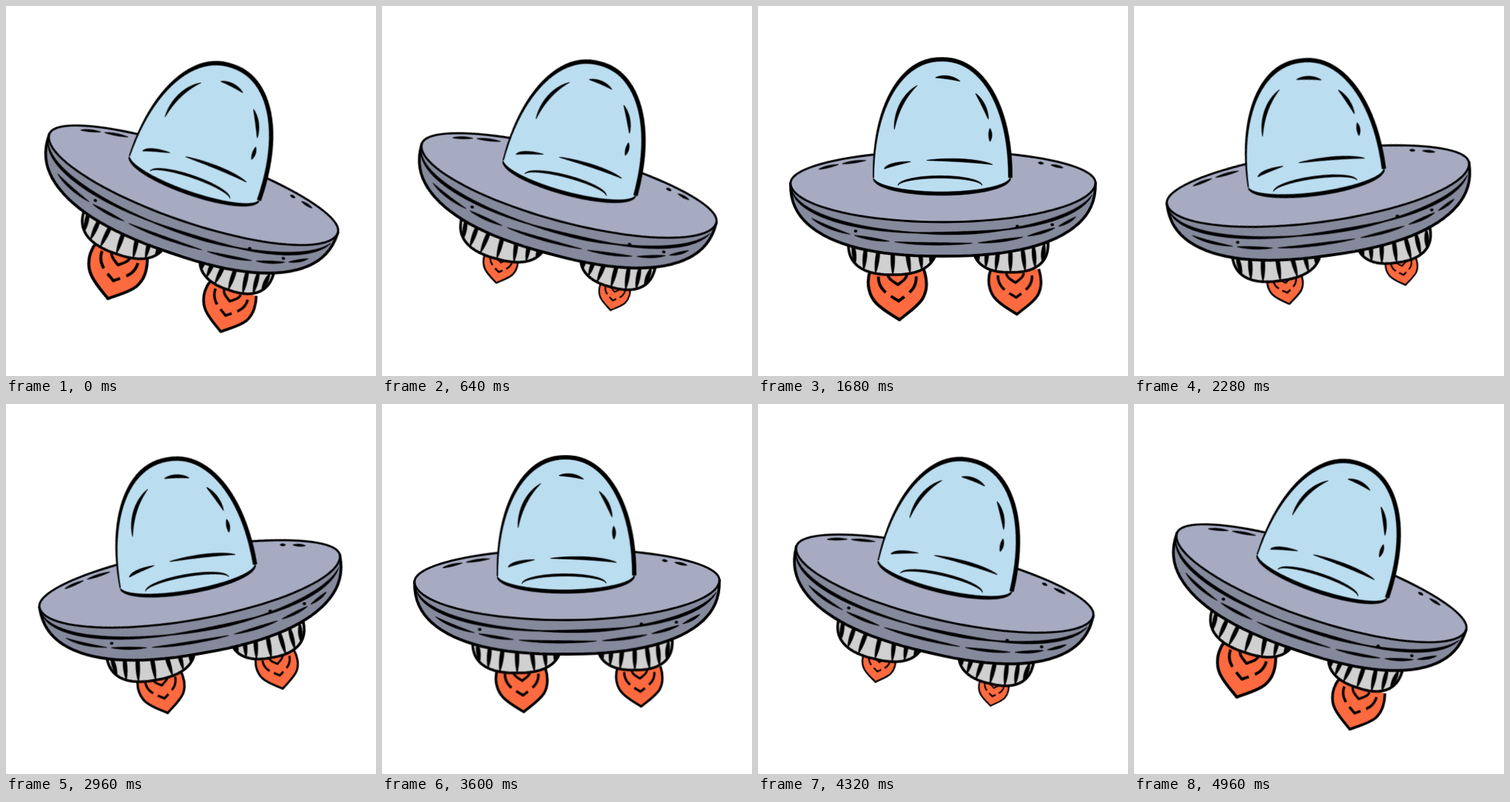
These frames come from a looping animation (500 by 500 pixels, 5000 ms). An HTML page:

```html
<!DOCTYPE html>
<html lang="en">
<head>
<meta charset="utf-8">
<title>Flying saucer</title>
<style>
  html, body { margin: 0; width: 100%; height: 100%; overflow: hidden; background: #fff; }
  svg { display: block; width: 100vw; height: 100vh; }
  path { stroke-linejoin: round; }

  #ship { transform-origin: 250px 250px; animation: rock 5s infinite; }
  @keyframes rock {
    0%   { transform: rotate(18.9deg); animation-timing-function: cubic-bezier(.33, 0, .67, 1); }
    56%  { transform: rotate(-10.4deg); animation-timing-function: cubic-bezier(.3, 0, .6, 1); }
    100% { transform: rotate(18.5deg); }
  }

  .burn { transform-origin: 0 0; animation: burn 1.66667s cubic-bezier(.33, 0, .67, 1) infinite; }
  @keyframes burn {
    0%, 100% { transform: scale(1); }
    50%      { transform: scale(.53); }
  }
</style>
</head>
<body>
<svg viewBox="0 0 500 500">
  <defs>
    <path id="tongue" pathLength="100"
          d="M-36 4C-43 22-38 40-28 50C-18 60-6 66 3 72C12 64 26 56 34 44C41 32 41 20 36 4"/>
    <g id="flame" fill="#fd6a3f" stroke="#000">
      <use href="#tongue" stroke-width="4"/>
      <use href="#tongue" transform="scale(.65)" stroke-width="6" stroke-dasharray="0 10 22 8 20 8 22 10"/>
      <use href="#tongue" transform="scale(.34)" stroke-width="11" stroke-dasharray="0 15 70 15"/>
    </g>
  </defs>
  <g id="ship">
    <g transform="translate(188 352)"><g class="burn"><use href="#flame"/></g></g>
    <g transform="translate(347 352) scale(.9)"><g class="burn"><use href="#flame"/></g></g>
  </g>
</svg>
<script>
  const ship = document.getElementById("ship");

  // Point on an oval at an angle in degrees; a power above 2 makes it boxier.
  const oval = (cx, cy, rx, ry, power = 2) => deg => {
    const a = deg * Math.PI / 180;
    const bend = v => Math.sign(v) * Math.abs(v) ** (2 / power);
    return [cx + rx * bend(Math.cos(a)), cy - ry * bend(Math.sin(a))];
  };

  const mix = (f, g, k) => deg => {
    const p = f(deg), q = g(deg);
    return p.map((v, i) => v + (q[i] - v) * k);
  };

  const trace = (curve, from, to, steps = 48) =>
    Array.from({ length: steps + 1 }, (_, i) => curve(from + (to - from) * i / steps));

  function draw(points, fill, width = 0, close = true) {
    const path = document.createElementNS("http://www.w3.org/2000/svg", "path");
    path.setAttribute("d", "M" + points.map(p => p.map(v => v.toFixed(2))).join("L") + (close ? "Z" : ""));
    path.setAttribute("fill", fill);
    path.setAttribute("stroke", width ? "#000" : "none");
    path.setAttribute("stroke-width", width);
    ship.append(path);
  }

  const taper = t => Math.sin(Math.PI * t) ** .7;

  // Ink stroke along a curve, its width following a profile.
  function brush(curve, from, to, width, profile = taper) {
    const line = trace(curve, from, to), last = line.length - 1;
    const edge = side => line.map(([x, y], i) => {
      const p = line[Math.max(i - 1, 0)], q = line[Math.min(i + 1, last)];
      const dx = q[0] - p[0], dy = q[1] - p[1];
      const k = side * width * profile(i / last) / 2 / Math.hypot(dx, dy);
      return [x - dy * k, y + dx * k];
    });
    draw([...edge(1), ...edge(-1).reverse()], "#000", .5);
  }

  // Consecutive strokes with a small gap at each break.
  function dashes(curve, breaks, width, gap = 1) {
    breaks.slice(1).forEach((end, i) => brush(curve, breaks[i] + gap, end - gap, width));
  }

  function engine(cx, rx, ry) {
    const cup = oval(cx, 320, rx, ry, 2.5);
    draw(trace(cup, 180, 360), "#d0d0d1", 3.6);
    for (let i = -3; i <= 3; i++) {
      const foot = cup(270 + i * 18);
      const top = [cx + i * rx * .3, 320];
      brush(t => mix(() => top, () => foot, t)(), 0, 1, 5.5);
    }
  }

  function saucer() {
    const back = oval(250, 239, 206, 43), rim = oval(250, 239, 206, 53);
    const belly = oval(250, 239, 206, 99, 2.4);
    const side = depth => mix(rim, belly, depth);

    draw(trace(belly, 180, 360), "#85899c", 3.8);
    draw([...trace(back, 0, 180), ...trace(rim, 180, 360)], "#a6abc1", 2.8);

    dashes(side(.33), [188, 263, 291, 345], 4.2, -3);
    dashes(side(.64), [211, 236, 253, 280, 300, 316, 330], 3.6);
    for (const [deg, depth] of [[237, .5], [298, .28], [314, .5]]) {
      const [x, y] = side(depth)(deg);
      draw(trace(oval(x, y, 2.4, 2), 0, 360, 12), "#000");
    }

    const shine = oval(250, 239, 196, 36);
    dashes(shine, [32, 44, 51], 3.2, 2);
    dashes(shine, [121, 135, 150], 3.2);
  }

  function dome() {
    const shell = oval(248.5, 232, 92.5, 160, 2.16), base = oval(248.5, 232, 92.5, 21.5);
    draw([...trace(shell, 180, 0), ...trace(base, 360, 180)], "#bbddf0");
    brush(shell, 180, 0, 5.4, t => Math.min(1, .25 + 2 * t));
    brush(base, 182, 360, 5, t => taper(t) ** .6);

    const gleam = oval(249, 175, 65, 79);
    for (const [from, to] of [[174, 121], [98, 68], [46, 16], [7, -6]]) brush(gleam, from, to, 4.6);

    const fold = oval(250, 222, 80, 14);
    brush(fold, 172, 123, 4);
    brush(fold, 106, 33, 4.4);
    brush(oval(246, 243, 57, 12), 178, 2, 3.4);
  }

  engine(182, 60, 43);
  engine(341, 51, 40);
  saucer();
  dome();
</script>
</body>
</html>
```
